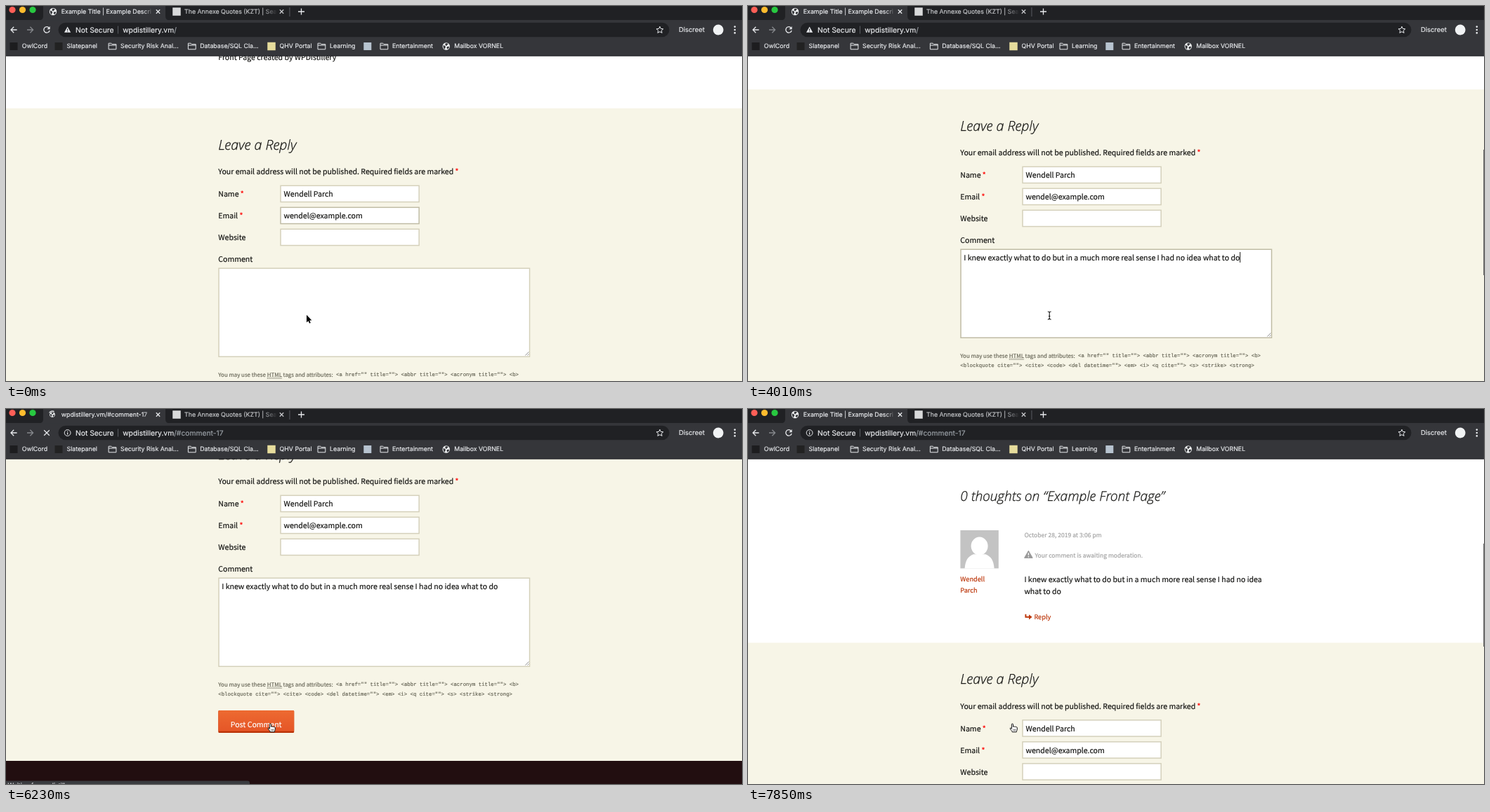
An HTML page that plays this animation: 1048x535 px, repeating every 8000 ms.

```html
<!DOCTYPE html>
<html lang="en">
<head>
<meta charset="utf-8">
<title>Comment form</title>
<style>
html, body { margin: 0; width: 100%; height: 100%; overflow: hidden; background: #fff; }
svg { display: block; width: 1048px; height: 535px; }
text { white-space: pre; text-rendering: geometricPrecision; }
text, tspan { fill: var(--ink); stroke: var(--ink); stroke-width: .18; }
.page text { font: 10.56px 'Noto Sans CJK SC', 'Noto Sans CJK JP', 'Noto Sans CJK KR', 'Noto Sans CJK', sans-serif; }
.page { --ink: #141412; }
.page .title { font: italic 300 19.1px 'Open Sans', 'Noto Sans', sans-serif; stroke-width: .25; }
.page .reply { font-size: 19.6px; }
.page .hint { font-size: 7.9px; --ink: #686758; }
.page .code { font: 7.35px 'Liberation Mono', monospace; --ink: #686758; }
.page .meta { font-size: 8.55px; --ink: #a2a2a2; }
.page .link { font-size: 9.2px; --ink: #bc360a; }
.page .star { --ink: #f00; }
.page .label { --ink: #fff; }
.field { fill: #fff; stroke: #d4d0ba; stroke-width: 1.47; }
.field.on { stroke: #bfbba4; }
.ui { --ink: #e8eaed; }
.ui text { font: 8.8px Inter, 'Liberation Sans', sans-serif; }
.ui .url { font-size: 10.3px; }
.ui .dim { --ink: #9aa0a6; }
.line { fill: none; stroke: #e8eaed; stroke-width: 1.3; }
.thin { stroke-width: 1; }
</style>
</head>
<body>
<svg id="stage" viewBox="0 0 1048 535" xmlns="http://www.w3.org/2000/svg"></svg>
<script>
const NAME = ['Wendell', 'Parch'];
const MAIL = 'wendel@example.com';
const QUOTE = ['I knew exactly what to do but in a much more real sense I had no idea', 'what to do'];

const text = (x, y, s, cls = '', id = '') => `<text x="${x}" y="${y}" class="${cls}" id="${id}">${s}</text>`;
const esc = s => s.replace(/</g, '&lt;').replace(/>/g, '&gt;');
const rect = (x, y, w, h, fill, more = '') =>
  `<rect x="${x}" y="${y}" width="${w}" height="${h}" fill="${fill}" ${more}/>`;
const field = (x, y, w, h, id) =>
  `<rect class="field" id="${id}" x="${x + .73}" y="${y + .73}" width="${w - 1.47}" height="${h - 1.47}"/>`;
const row = (y, label, value, id, star) =>
  text(302.3, y + 4, label + (star ? ' <tspan class="star">*</tspan>' : '')) +
  field(390.3, y - 12.4, 198.6, 24.7, id) + text(395.6, y + 4, value);
const globe = (x, y, r = 5.2) => `<g transform="translate(${x} ${y}) scale(${r / 5})">
  <circle r="5" fill="#f1f3f4"/>
  <path d="M-4-1.6L-1.6-.4L-.6 1.2L-1.6 2.2V4.2C-3.4 3.6-4.3 1.4-4-1.6ZM-1-4.2L1.6-4L2.8-2.6L1.2-2L.6-.6L-1.4-1.4ZM1.2 .6L4.1 .2C4 2 3 3.4 1.8 3.9L.6 2.2Z" fill="#35363a"/></g>`;
const folder = x => `<path class="line thin" d="M${x - 5.4} 53.2h3.8l1.2 1.4h5.8v7.2h-10.8zM${x - 5.4} 56h10.8"/>`;
const mark = (x, y, fill, s = 11) => rect(x - s / 2, y - s / 2, s, s, fill);
const cross = (x, y, r) => `<path class="line" d="M${x - r} ${y - r}l${2 * r} ${2 * r}m0-${2 * r}l-${2 * r} ${2 * r}"/>`;

const form = `<g id="form">
  ${rect(0, 146, 1048, 489, '#f7f5e7')}
  ${text(302.3, 204.7, 'Leave a Reply', 'title reply')}
  ${text(302.3, 240, 'Your email address will not be published. Required fields are marked <tspan class="star">*</tspan>')}
  ${row(268, 'Name', NAME.join(' '), 'name', true)}
  ${row(299, 'Email', MAIL, 'email', true)}
  ${row(330, 'Website', '', 'site')}
  ${text(302.3, 365, 'Comment')}
  ${field(302.3, 373.5, 444, 127.5, 'area')}
  <path d="M739.5 498.5l5-5m-2 5l2-2" stroke="#777" stroke-width=".8"/>
  ${text(307.2, 390, QUOTE.join(' '), '', 'typed')}
  <rect id="caret" y="378" width="1" height="15" fill="#141412"/>
  ${text(302.3, 528.5, 'You may use these', 'hint')}
  ${text(371.8, 528.5, 'HTML', 'hint')}
  ${text(394.6, 528.5, 'tags and attributes:', 'hint')}
  <path d="M371.8 529.9h21.4m-21.4 1.6h21.4" stroke="#686758" stroke-width=".7" stroke-dasharray="1.2 .7"/>
  ${text(470, 528.3, esc('<a href="" title=""> <abbr title=""> <acronym title=""> <b>'), 'code')}
  ${text(302.3, 541.8, esc('<blockquote cite=""> <cite> <code> <del datetime=""> <em> <i> <q cite=""> <s> <strike> <strong>'), 'code')}
  <rect x="302.3" y="563" width="107.9" height="32" rx="1.5" fill="#b93207"/>
  <rect id="button" x="302.3" y="563" width="107.9" height="29.8" rx="1.5"/>
  <text x="356.2" y="583" dy="4" text-anchor="middle" class="label">Post Comment</text>
  ${rect(0, 635, 1048, 500, '#220e10')}
  ${field(156.5, 664, 151, 25, 'search')}
</g>`;

const thread = `<g id="thread">
  ${text(302.3, 131, '0 thoughts on “Example Front Page”', 'title')}
  ${rect(302.4, 173, 54.4, 54.4, '#c3c3c3')}
  <ellipse cx="329.6" cy="195.6" rx="12" ry="13" fill="#fff"/>
  <path d="M308.6 227.4C309.4 216 313 210.4 321 207.2H338.2C346.2 210.4 349.8 216 350.6 227.4Z" fill="#fff"/>
  ${text(302.3, 246, NAME[0], 'link')}${text(302.3, 261.5, NAME[1], 'link')}
  ${text(393.4, 183.2, 'October 28, 2019 at 3:06 pm', 'meta')}
  <path d="M399.4 202.3L405.2 212.4H393.6Z" fill="#999" stroke="#999" stroke-linejoin="round"/>
  <path d="M399.4 205.2v3.6m0 1.2v1.4" stroke="#fff" stroke-width="1.4"/>
  ${text(408.4, 212, 'Your comment is awaiting moderation.', 'meta')}
  ${text(393.4, 246.5, QUOTE[0])}${text(393.4, 264, QUOTE[1])}
  <path d="M395.4 292.8V296.8H401" fill="none" stroke="#bc360a" stroke-width="1.9"/>
  <path d="M400 293.2L404.6 296.8L400 300.6Z" fill="#bc360a"/>
  ${text(407.4, 299.6, 'Reply', 'link')}
</g>`;

const browser = `<g class="ui">
  ${rect(0, 0, 1048, 21, '#202124')}
  ${rect(0, 20, 1048, 51.5, '#35363a')}
  ${rect(0, 70.6, 1048, .9, '#222326')}
  <path d="M47 20.5Q53 20.5 53 14V0H227V14Q227 20.5 233 20.5Z" fill="#35363a"/>
  <circle cx="9" cy="5.5" r="4.6" fill="#ff5f57"/>
  <circle cx="23.5" cy="5.5" r="4.6" fill="#febc2e"/>
  <circle cx="38" cy="5.5" r="4.6" fill="#28c840"/>
  <g id="tabIcon">${globe(67, 8)}</g>
  <g id="spinner">${globe(66, 8, 3.8)}<path id="arc" class="line" d="M66 2.9A5.1 5.1 0 0 1 71.1 8"/></g>
  ${text(78.8, 11.2, '', '', 'tabText')}
  ${rect(196, 0, 13, 16, 'url(#fadeA)')}
  ${cross(216.5, 8, 2.7)}
  ${mark(243, 8, '#d8d9da', 11.5)}
  <g opacity=".82">${text(254, 11.2, 'The Annexe Quotes (KZT) | Sea')}${cross(392.5, 8, 2.7)}</g>
  ${rect(366, 0, 20, 16, 'url(#fadeB)')}
  ${rect(403.5, 2, .9, 13, '#5f6368')}
  <path class="line" d="M416 8h9m-4.5-4.5v9"/>
  <path class="line" d="M15.6 34H7m4.2-4.2L7 34l4.2 4.2"/>
  <path class="line" style="stroke:#85888c" d="M30 34h8.6m-4.2-4.2L38.6 34l-4.2 4.2"/>
  <g id="reload"><path class="line" d="M61.4 31.4A4.2 4.2 0 1 0 62.1 35"/><path d="M62.6 29v4.2h-4.2z" fill="#e8eaed"/></g>
  <g id="stop">${cross(58, 34, 3.8)}</g>
  ${rect(74.5, 23.7, 870, 20.6, '#202124', 'rx="10.3"')}
  <g id="warn"><path d="M87.6 29.6L92.2 37.8H83Z" fill="#e8eaed"/><path d="M87.6 32.4v2.6m0 .8v1" stroke="#202124"/></g>
  <g id="info"><circle class="line thin" cx="87.6" cy="34" r="4.4"/><path class="line" d="M87.6 33.4v3m0-4.9v1.1"/></g>
  ${text(99, 37.6, 'Not Secure', 'url')}
  ${rect(159, 28.5, .9, 11, '#5f6368')}
  <text x="166.2" y="37.6" class="url">wpdistillery.vm<tspan class="dim" id="path">/</tspan></text>
  <path class="line thin" d="M931 29.2L932.4 32.4L935.9 32.7L933.3 35L934.1 38.4L931 36.6L927.9 38.4L928.7 35L926.1 32.7L929.6 32.4Z"/>
  <text x="958" y="37.4" style="font-size:9.4px">Discreet</text>
  <circle cx="1014.2" cy="34" r="7.4" fill="#f1f3f4"/>
  ${[29.6, 34, 38.4].map(y => `<circle cx="1037.8" cy="${y}" r="1.3" fill="#e8eaed"/>`).join('')}
  ${mark(11, 57.5, '#1d1d1f')}${text(22.8, 60.4, 'OwlCord')}
  ${mark(75, 57.5, '#222')}${text(86.5, 60.4, 'Slatepanel')}
  ${folder(151.5)}${text(163, 60.4, 'Security Risk Anal...')}
  ${folder(264.8)}${text(276.2, 60.4, 'Database/SQL Cla...')}
  ${mark(378, 57.5, '#e6dc9c', 11.5)}${text(389.6, 60.4, 'QHV Portal')}
  ${folder(449.4)}${text(461, 60.4, 'Learning')}
  ${mark(514.8, 57.5, '#b7c3cf', 11)}
  ${folder(538.4)}${text(550, 60.4, 'Entertainment')}
  ${globe(626.8, 57.5)}${text(638.2, 60.4, 'Mailbox VORNEL')}
  <g id="status"><path d="M0 530.5H344Q347 530.5 347 533.5V535H0Z" fill="#3a3b3f"/>
  ${text(2.5, 540, 'Waiting for wpdistillery.vm...')}</g>
</g>`;

const cursors = `
  <path id="arrow" d="M0 0V10.6L2.4 8.4L4 12L5.8 11.2L4.2 7.7H7.4Z" fill="#000" stroke="#fff" stroke-width="1.4" paint-order="stroke"/>
  <path id="beam" d="M-2.4-5.6Q0-5.6 0-4V4Q0 5.6-2.4 5.6M2.4-5.6Q0-5.6 0-4M0 4Q0 5.6 2.4 5.6M-1.2 .9H1.2" fill="none" stroke="#111" stroke-width="1.1"/>
  <g id="hand" stroke="#111" stroke-width="1">
    <path d="M-3-4.9a1 1 0 0 1 2.1 0V-1.6c.2-.8 1.9-.8 2 .1c.4-.7 1.9-.5 1.9 .4c.5-.6 1.9-.4 1.9 .8V2.2c0 1.4-1 1.9-1 3.6H-2.2c0-1.7-2.4-3.2-3-4.8c-.2-1 .9-1.3 1.4-.7l.8 1z" fill="#fff"/>
    <path d="M-.6 1.6v2.6m1.6-2.6v2.6m1.6-2.6v2.6" stroke-width=".6"/>
  </g>`;

const ramp = (id, attrs, a, b, oa = 1) =>
  `<linearGradient id="${id}" ${attrs}><stop stop-color="${a}" stop-opacity="${oa}"/><stop offset="1" stop-color="${b}"/></linearGradient>`;

document.getElementById('stage').innerHTML = `<defs>
  ${ramp('fadeA', '', '#35363a', '#35363a', 0)}
  ${ramp('fadeB', '', '#202124', '#202124', 0)}
  ${ramp('idle', 'x2="0" y2="1"', '#e05d22', '#d94412')}
  ${ramp('lit', 'x2="0" y2="1"', '#ed6a31', '#e55627')}
  </defs>
  ${rect(0, 0, 1048, 535, '#fff')}
  <g class="page"><g id="intro">${text(302.3, 76.8, 'Front Page created by WPDistillery')}</g>${thread}${form}</g>
  <rect id="thumb" x="1047" width="1" fill="#707070"/>
  ${browser}${cursors}`;

// Each step changes part of the state; it holds until the next one.
const steps = [
  [0, { focus: 'email', caret: 0, typed: 0, scroll: 0, bar: 0, cur: 'arrow', x: 428, y: 440.8,
        lit: 0, spin: -1, moved: 0, posted: 0, status: 0 }],
  [140, { focus: 'area', caret: 1, cur: 'beam', x: 428.4, y: 441.6 }],
  [740, { caret: 0 }],
  [1180, { caret: 1 }],
  [1630, { typed: 1 }],
  [2230, { caret: 0 }],
  [2680, { caret: 1 }],
  [3120, { caret: 0 }],
  [3720, { caret: 1, x: 429.2 }],
  [4010, { scroll: 27, bar: 1 }],
  [4160, { scroll: 72, caret: 0, cur: 'arrow', x: 428.7, y: 440.8 }],
  [4310, { scroll: 104 }],
  [4450, { scroll: 124 }],
  [4600, { scroll: 133, caret: 1 }],
  [4890, { bar: .5, x: 424, y: 442 }],
  [5040, { bar: 0, caret: 0, cur: 'hand', x: 402, y: 450, lit: 1 }],
  [5180, { x: 384, y: 454 }],
  [5330, { x: 378.4, y: 455 }],
  [5630, { focus: '', spin: 0, status: 1 }],
  [5780, { spin: 1 }],
  [5930, { spin: 2 }],
  [6080, { spin: 3, moved: 1 }],
  [6230, { spin: 4 }],
  [6380, { spin: 5 }],
  [6520, { spin: 6 }],
  [6670, { spin: -1, posted: 1, typed: 0, lit: 0, scroll: 77.5, bar: 1 }],
  [6820, { status: 0, bar: 0 }],
  [7260, { scroll: 76.5, bar: 1 }],
  [7410, { scroll: 32 }],
  [7550, { scroll: 14 }],
  [7700, { scroll: 4 }],
  [7850, { scroll: 0 }]
];
const LOOP = 8000;

const el = id => document.getElementById(id);
const show = (id, on) => el(id).setAttribute('opacity', +on);
const shift = (id, y) => el(id).setAttribute('transform', `translate(0 ${y})`);

function draw(s) {
  const busy = s.spin >= 0;
  shift('intro', -s.scroll);
  shift('thread', -s.scroll);
  shift('form', (s.posted ? 187.5 : 0) - s.scroll);
  show('intro', !s.posted);
  show('thread', s.posted);

  for (const id of ['email', 'area']) el(id).classList.toggle('on', s.focus === id);
  show('typed', s.typed);
  show('caret', s.caret);
  el('caret').setAttribute('x', s.typed ? 700.2 : 307.2);
  el('button').setAttribute('fill', s.lit ? 'url(#lit)' : 'url(#idle)');

  show('thumb', s.bar);
  el('thumb').setAttribute('y', s.posted ? 192 + s.scroll * .327 : 194.8 + s.scroll * .377);
  el('thumb').setAttribute('height', s.posted ? 147 : 179);

  show('spinner', busy);
  show('tabIcon', !busy);
  show('stop', busy);
  show('reload', !busy);
  el('arc').setAttribute('transform', `rotate(${s.spin * 75} 66 8)`);
  el('tabText').textContent = busy && s.moved ? 'wpdistillery.vm/#comment-17' : 'Example Title | Example Descri';
  el('path').textContent = s.moved ? '/#comment-17' : '/';
  show('warn', !s.moved);
  show('info', s.moved);
  show('status', s.status);

  for (const id of ['arrow', 'beam', 'hand']) show(id, s.cur === id);
  el(s.cur).setAttribute('transform', `translate(${s.x} ${s.y})`);
}

let start = null, last = -1;
function tick(now) {
  if (start === null) start = now;
  const t = (now - start) % LOOP;
  const past = steps.filter(([at]) => at <= t);
  if (past.length !== last) {
    last = past.length;
    draw(Object.assign({}, ...past.map(step => step[1])));
  }
  requestAnimationFrame(tick);
}
draw(steps[0][1]);
requestAnimationFrame(tick);
</script>
</body>
</html>
```
